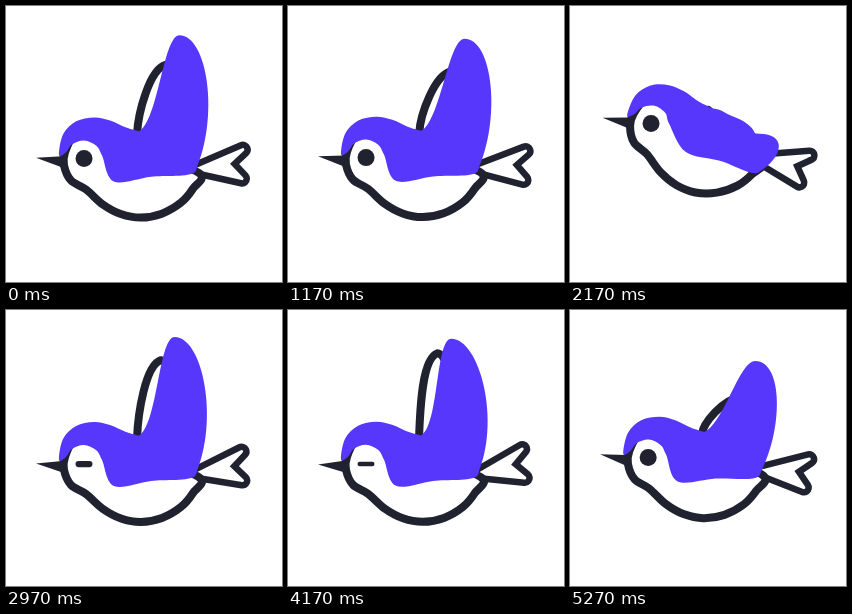
Write an HTML page with a canvas that moves like this. It is 276 px wide and 276 px high and loops after 5.31 s.

```html
<!DOCTYPE html>
<html lang="en">
<head>
<meta charset="utf-8">
<title>Flying bird</title>
<style>
html, body { margin: 0; width: 100%; height: 100%; overflow: hidden; background: #fff; }
canvas { display: block; width: 276px; height: 276px; }
</style>
</head>
<body>
<canvas id="stage" width="276" height="276"></canvas>
<script>
const ctx = document.getElementById('stage').getContext('2d');
const BLUE = '#5637fb', DARK = '#20222f', WHITE = '#fff';
const LOOP = 5310, FLAP = 17.72, TICK = 100 / 3;
const { sin, cos, min, max, floor, PI } = Math;

// Body outline points at the lowest point of the flight.
const cap = [[53, 150], [57, 129], [70, 116], [88, 112], [104, 115], [120, 122]];
const face = [[96, 150], [90, 140], [78, 135], [66, 139], [60, 147]];
const belly = [[59, 147], [58, 160], [65, 175], [80, 184], [97, 199], [115, 208.5],
  [135, 212], [156, 208], [175, 197], [187, 183], [194, 168], [150, 150], [85, 122], [68, 130]];

const radians = deg => deg * PI / 180;
const angle = (p, shift) => 2 * PI * (p - shift) / FLAP;
const wave = (p, shift) => cos(angle(p, shift));

// Closed curve through all points.
function smooth(pts) {
  const n = pts.length, at = i => pts[(i + n) % n];
  ctx.beginPath();
  ctx.moveTo(...pts[0]);
  for (let i = 0; i < n; i++) {
    const [a, b, c, d] = [at(i - 1), at(i), at(i + 1), at(i + 2)];
    ctx.bezierCurveTo(b[0] + (c[0] - a[0]) / 6, b[1] + (c[1] - a[1]) / 6,
      c[0] - (d[0] - b[0]) / 6, c[1] - (d[1] - b[1]) / 6, c[0], c[1]);
  }
  ctx.closePath();
}

function line(color, width) {
  ctx.strokeStyle = color;
  ctx.lineWidth = width;
  ctx.lineJoin = 'round';
  ctx.stroke();
}

function outlined() {
  ctx.fillStyle = WHITE;
  ctx.fill();
  line(DARK, 8);
}

function fillShape(color) {
  ctx.fillStyle = color;
  ctx.fill();
}

function polygon(...pts) {
  ctx.beginPath();
  pts.forEach(pt => ctx.lineTo(...pt));
  ctx.closePath();
}

// Wing tip over one flap; the wing is drawn in on the way up.
function wingTip(p) {
  const a = angle(p, 0.6);
  const fold = 38 * min(0, sin(a)) * (1 - cos(a)) ** 2;
  return [max(158, 168 - 27 * sin(a)), 137 - 110 * cos(a) + fold];
}

function drawWing([rx, ry], [x, y], [ex, ey]) {
  ctx.beginPath();
  ctx.moveTo(rx - 4, ry + 1);
  ctx.bezierCurveTo(rx + 18, ry - 3, x - 17, y, x, y);
  ctx.bezierCurveTo(x + 28, y, ex + 25, ey + (y - ey) * 0.4, ex, ey);
  ctx.closePath();
  fillShape(BLUE);
}

// The far wing lags behind the near one.
function drawFarWing(p, [rx, ry]) {
  const a = angle(p, 1.8), y = wingTip(p - 1.2)[1] * 0.93 + 15;
  const x = max(140, 142 - 30 * sin(a)), bx = rx - 3, by = ry + 2;
  ctx.beginPath();
  ctx.moveTo(bx, by);
  ctx.bezierCurveTo(bx + 1, by + (y - by) * 0.3, x - 16, y + (by - y) / 16, x, y);
  ctx.quadraticCurveTo(x + 14, y, 175, 140);
  ctx.closePath();
  outlined();
}

function drawTail(p, lift) {
  ctx.save();
  ctx.translate(197 - 2 * lift, 164 - 10 * lift);
  ctx.rotate(radians(1 + 19 * wave(p, -4.6)));
  polygon([-5, -1], [40, -20], [25, -6], [39, 9]);
  line(DARK, 16);
  line(WHITE, 3);
  fillShape(WHITE);
  ctx.restore();
}

function drawBeak(p, [x, y]) {
  polygon([x - 28, y - 2 - 6 * wave(p, -3.2)], [x - 2, y - 6], [x + 3, y + 7]);
  fillShape(DARK);
}

// The eye blinks on every second flap.
function drawEye(p, cycle, [x, y]) {
  const h = cycle % 2 ? min(17, 4 + 1.9 * (p - 1.6) ** 2) : 17;
  ctx.beginPath();
  ctx.roundRect(x - 8.5, y + (17 - h) * 0.1 - h / 2, 17, h, h / 2);
  fillShape(DARK);
}

function draw(ms) {
  const f = ms / TICK;
  const cycle = floor(f / FLAP + 0.5);
  const p = f - cycle * FLAP;

  // The body rises and pitches up as the wing comes down.
  const lift = (1 - wave(p, 0.7)) / 2;
  const c = cos(radians(13.7 * lift)), s = sin(radians(13.7 * lift));
  const place = ([x, y]) => [
    197 - 2 * lift + (x - 197) * c - (y - 165) * s,
    165 - 15 * lift + (x - 197) * s + (y - 165) * c
  ];
  const root = place([134, 126]), end = [189, 166];
  const [mx, my] = place([145, 171]), [lx, ly] = place([108, 176]);
  const hem = [[mx + 8 * lift, my + 8 * lift], [lx + 14 * lift * lift, ly]];

  ctx.fillStyle = WHITE;
  ctx.fillRect(0, 0, 276, 276);
  drawFarWing(p, root);
  drawTail(p, lift);
  smooth(belly.map(place));
  outlined();
  drawBeak(p, place([58, 157]));
  smooth([...cap.map(place), root, place([178, 138]), end, ...hem, ...face.map(place)]);
  fillShape(BLUE);
  drawWing(root, wingTip(p), end);
  drawEye(p, cycle, place([78, 153]));
}

const start = performance.now();
function tick() {
  draw((performance.now() - start) % LOOP);
  requestAnimationFrame(tick);
}
tick();
</script>
</body>
</html>
```
